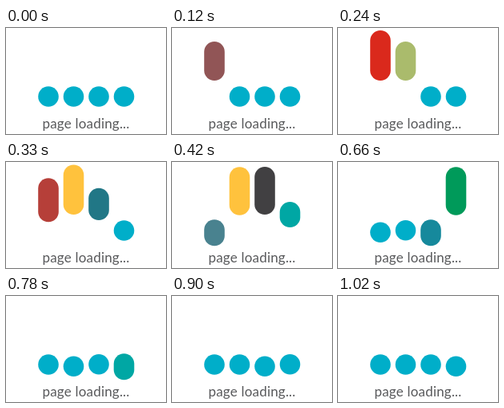
An HTML page for the animation above (1.05 s loop, 200x133 px).

```html
<!DOCTYPE html>
<html lang="en">
<head>
<meta charset="utf-8">
<title>Page loading</title>
<style>
html, body { margin: 0; width: 100%; height: 100%; overflow: hidden; background: #fff; }
svg { display: block; width: 100vw; height: 100vh; }
text { font: 17px Lato, "Open Sans", sans-serif; letter-spacing: .2px; fill: #58595b; }
</style>
</head>
<body>
<svg viewBox="0 0 200 133">
  <g id="bars"></g>
  <text x="100" y="126" text-anchor="middle">page loading...</text>
</svg>
<script>
const LOOP = 1050, FRAME = 30, STAGGER = 120, KEY = 60, WIDTH = 25.6;
const REST = [0, 174, 201];
const PEAKS = [[218, 41, 28], [255, 194, 61], [65, 64, 66], [0, 154, 90]];

// One key every 60 ms of a bar's own time: vertical centre and height
const CENTER = [86, 66, 41.5, 36, 34.5, 36.5, 62, 88.8, 88, 85.7, 87, 88.3, 87.3, 86];
const HEIGHT = [WIDTH, 32, 49, 60, 63, 60.5, 48, 33, WIDTH];

const clamp = (v, lo, hi) => Math.min(hi, Math.max(lo, v));

// Catmull-Rom curve through evenly spaced keys
function curve(keys, time) {
  const last = keys.length - 1;
  const pos = clamp(time / KEY, 0, last);
  const i = Math.min(Math.floor(pos), last - 1), u = pos - i;
  const at = n => keys[clamp(n, 0, last)];
  const [a, b, c, d] = [at(i - 1), at(i), at(i + 1), at(i + 2)];
  return b + u / 2 * (c - a + u * (2 * a - 5 * b + 4 * c - d + u * (3 * (b - c) + d - a)));
}

// Colour fades in over 180 ms, holds, then fades out from 300 to 480 ms
function color(peak, time) {
  const k = clamp(Math.min(time, 480 - time) / 180, 0, 1);
  return `rgb(${REST.map((v, i) => Math.round(v + (peak[i] - v) * k))})`;
}

const set = (el, attrs) => {
  for (const name in attrs) el.setAttribute(name, attrs[name]);
};

const bars = PEAKS.map((peak, i) => {
  const el = document.createElementNS("http://www.w3.org/2000/svg", "rect");
  set(el, { x: 40.2 + 31.5 * i, width: WIDTH, rx: WIDTH / 2 });
  document.getElementById("bars").append(el);
  return el;
});

function draw(time) {
  bars.forEach((el, i) => {
    const local = Math.max(0, time - i * STAGGER);
    const height = Math.max(WIDTH, curve(HEIGHT, local));
    set(el, { y: curve(CENTER, local) - height / 2, height, fill: color(PEAKS[i], local) });
  });
}

const start = performance.now();
function tick() {
  const time = (performance.now() - start) % LOOP;
  draw(Math.floor(time / FRAME) * FRAME);
  requestAnimationFrame(tick);
}
tick();
</script>
</body>
</html>
```
